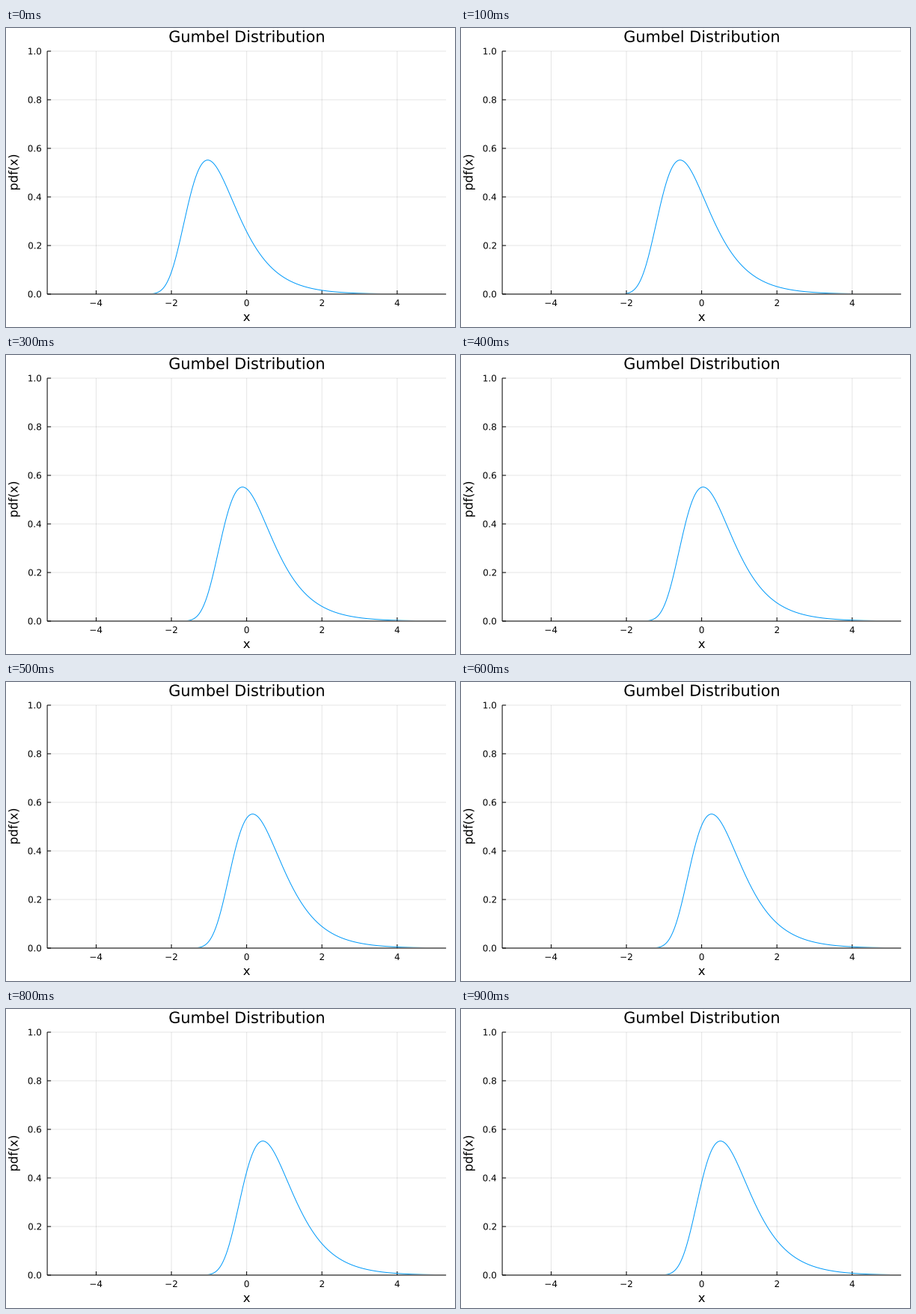
Write a matplotlib script that moves like this. It is 600 px wide and 400 px high and loops after 1 s.

```python
import numpy as np
import matplotlib.pyplot as plt
from matplotlib.animation import FuncAnimation
from matplotlib.patches import PathPatch, Rectangle
from matplotlib.textpath import TextPath
from matplotlib.transforms import Affine2D

W, H, DPI = 600, 400, 100
LEFT, RIGHT, TOP, BOTTOM = 55.1, 588.1, 31, 356
X_LIM = 5.3
FRAMES = 10
BETA, FINAL_MODE = 2 / 3, 0.5
PX = 72 / DPI  # points per pixel
TICK, TITLE, GUIDE = 11.95, 20.8, 16.4  # text sizes in pixels

plt.rcParams["font.family"] = "DejaVu Sans"

# The stage uses pixel coordinates with the origin at the top left.
fig = plt.figure(figsize=(W / DPI, H / DPI), dpi=DPI, facecolor="white")
stage = fig.add_axes([0, 0, 1, 1])
stage.set(xlim=(0, W), ylim=(H, 0))
stage.axis("off")


def to_px(x, y):
    return (LEFT + (x + X_LIM) / (2 * X_LIM) * (RIGHT - LEFT),
            BOTTOM - y * (BOTTOM - TOP))


def line(xs, ys, color="black", **kwargs):
    """Unsnapped one-pixel line."""
    artist, = stage.plot(xs, ys, color=color, linewidth=PX, snap=False,
                         solid_capstyle="butt", **kwargs)
    return artist


def label(x, y, text, size, align=0.5, angle=0):
    """Outline text on a baseline; align 0.5 centres it, 1 ends it at x."""
    path = TextPath((0, 0), text, size=size)
    box = path.get_extents()
    place = (Affine2D().translate(-box.x0 - align * box.width, 0)
             .scale(1, -1).rotate_deg(-angle).translate(x, y))
    stage.add_patch(PathPatch(place.transform_path(path), facecolor="black",
                              linewidth=0, snap=False))


for t in (-4, -2, 0, 2, 4):
    x, _ = to_px(t, 0)
    line([x, x], [TOP, BOTTOM], alpha=0.1)
    line([x, x], [BOTTOM - 5, BOTTOM])
    label(x, 372, str(t).replace("-", "−"), TICK)
for t in np.linspace(0, 1, 6):
    _, y = to_px(0, t)
    line([LEFT, RIGHT], [y, y], alpha=0.1)
    line([LEFT, LEFT + 5], [y, y])
    label(47, y + 4.36, f"{t:.1f}", TICK, align=1)
line([LEFT, LEFT], [TOP, BOTTOM])
line([LEFT, RIGHT], [BOTTOM, BOTTOM])

middle = (LEFT + RIGHT) / 2
label(middle, 18.8, "Gumbel Distribution", TITLE)
label(middle, 392, "x", GUIDE)
label(15.5, 193, "pdf(x)", GUIDE, angle=90)

xs = np.linspace(-5, 5, 1001)
curve = line([], [], color="#009AFA")
curve.set_clip_path(Rectangle((LEFT, TOP), RIGHT - LEFT, BOTTOM - TOP - 1,
                              transform=stage.transData))


def gumbel_pdf(x, mode):
    z = (x - mode) / BETA
    return np.exp(-z - np.exp(-z)) / BETA


def update(i):
    # Raising the CDF to a power only shifts the mode logarithmically.
    mode = FINAL_MODE + BETA * np.log((i + 1) / FRAMES)
    curve.set_data(*to_px(xs, gumbel_pdf(xs, mode)))
    return curve,


anim = FuncAnimation(fig, update, frames=FRAMES, interval=100,
                     repeat=True, repeat_delay=0)
plt.show()
```
